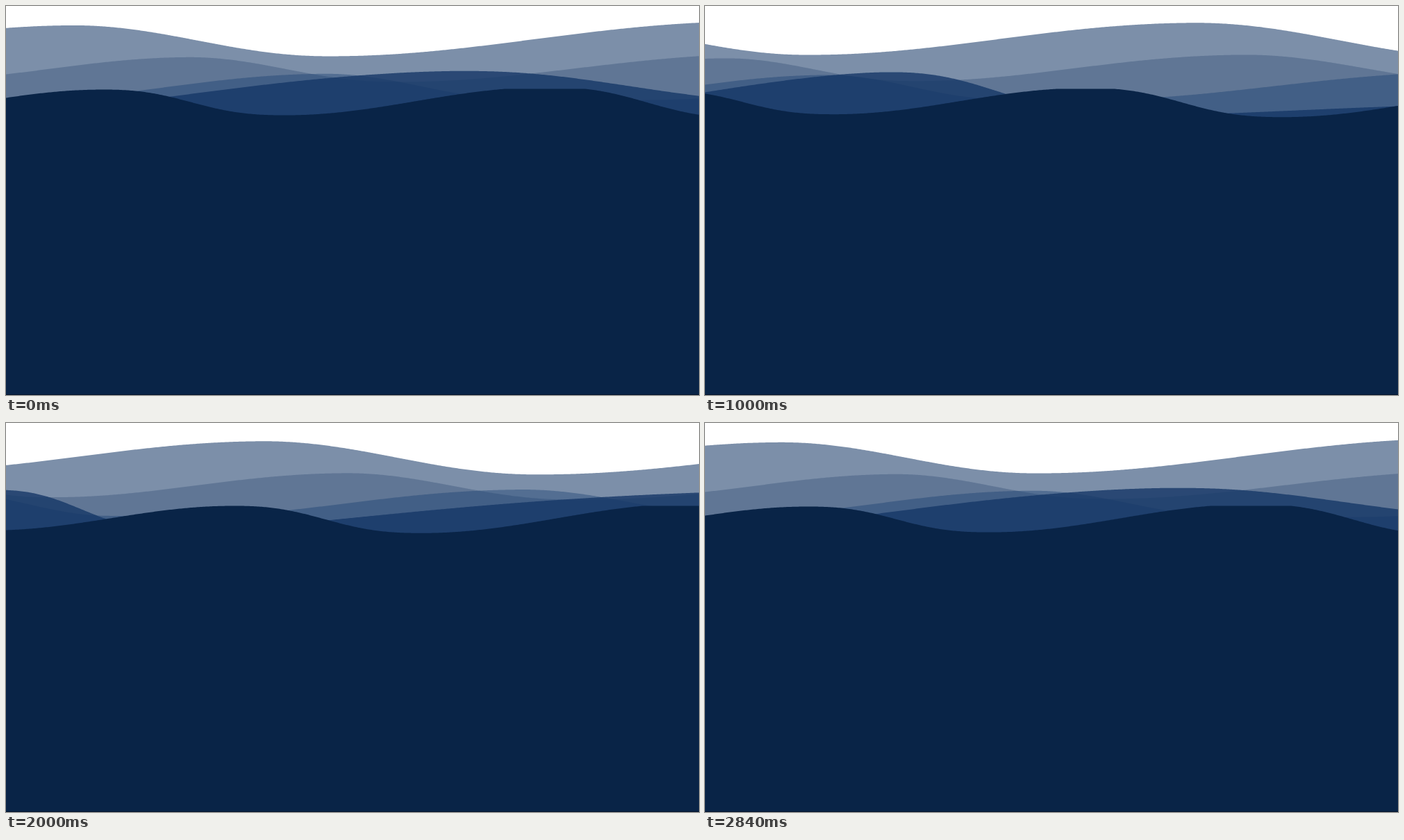
Animation of 998x561 px, one loop 2.88 s. Source, as an HTML page with a canvas:

```html
<!DOCTYPE html>
<html lang="en">
<head>
<meta charset="utf-8">
<title>Waves</title>
<style>
  html, body { margin: 0; width: 100%; height: 100%; overflow: hidden; background: #fff; }
  canvas { display: block; }
</style>
</head>
<body>
<canvas id="sea" width="998" height="561"></canvas>
<script>
const W = 998, H = 561, LOOP = 2880, STEP = 40;
const ctx = document.getElementById('sea').getContext('2d');

// start: ms a crest needs to reach the left edge at time 0
// pace, bend: ms per pixel at the left edge, and how it shrinks to the right
// crest, trough: heights at the left and right edge
// rise, fall: duration in ms before and after the crest; sharp*: steepness of the slope
const layers = [
  { color: 'rgb(124,143,169)', start: 3195, pace: 3.39, bend: .00038,
    crest: [28.5, 22.5], trough: [69.6, 75.7], rise: 1721, fall: 1159 },
  { color: 'rgba(68,94,129,.5)', start: 4005, pace: 4.5, bend: .0008,
    crest: [75.6, 68.9], trough: [106.8, 111.3], rise: 1720, fall: 1110 },
  { color: 'rgba(22,60,110,.4)', start: 4555, pace: 4, bend: .00075,
    crest: [100.5, 94.5], trough: [133.5, 136], rise: 1560, fall: 900 },
  { color: 'rgba(22,56,103,.8)', start: 1934, pace: 3.95, bend: .0015,
    crest: [96.5, 92.3], trough: [154, 159.5], rise: 1910, fall: 970, sharpRise: .85, sharpFall: 1.2 },
  { color: 'rgb(9,36,71)', start: 3529, pace: 4.85, bend: .00039, top: 119.5,
    crest: [121.3, 115.8], trough: [155, 161.3], rise: 1664, fall: 1216, sharpFall: 1.2 }
];

const mix = (a, b, k) => a + (b - a) * k;

// Cosine ease from 0 to 1; sharp above 1 steepens the middle.
function ease(k, sharp) {
  const s = (1 - Math.cos(Math.PI * Math.min(1, k))) / 2;
  const a = s ** sharp, b = (1 - s) ** sharp;
  return a / (a + b);
}

// 0 at the crest, 1 in the trough.
function depth({ rise, fall, sharpRise = 1, sharpFall = 1 }, phase) {
  const after = ((phase % LOOP) + LOOP) % LOOP;
  const before = LOOP - after;
  return before < rise ? ease(before / rise, sharpRise) : ease(after / fall, sharpFall);
}

function height(layer, x, time) {
  const { start, pace, bend, crest, trough, top = 0 } = layer;
  const phase = time + x * (pace - bend * x) - start;
  const y = mix(mix(...crest, x / W), mix(...trough, x / W), depth(layer, phase));
  return Math.max(top, y);
}

function draw(time) {
  ctx.fillStyle = '#fff';
  ctx.fillRect(0, 0, W, H);
  for (const layer of layers) {
    ctx.beginPath();
    ctx.moveTo(0, H);
    for (let x = 0; x <= W; x += 2) ctx.lineTo(x, height(layer, x, time));
    ctx.lineTo(W, H);
    ctx.fillStyle = layer.color;
    ctx.fill();
  }
  ctx.fillStyle = '#04142b';
  ctx.fillRect(0, H - 1, W, 1);
}

const begin = performance.now();
function tick() {
  const elapsed = (performance.now() - begin) % LOOP;
  draw(Math.floor(elapsed / STEP) * STEP);
  requestAnimationFrame(tick);
}
tick();
</script>
</body>
</html>
```
